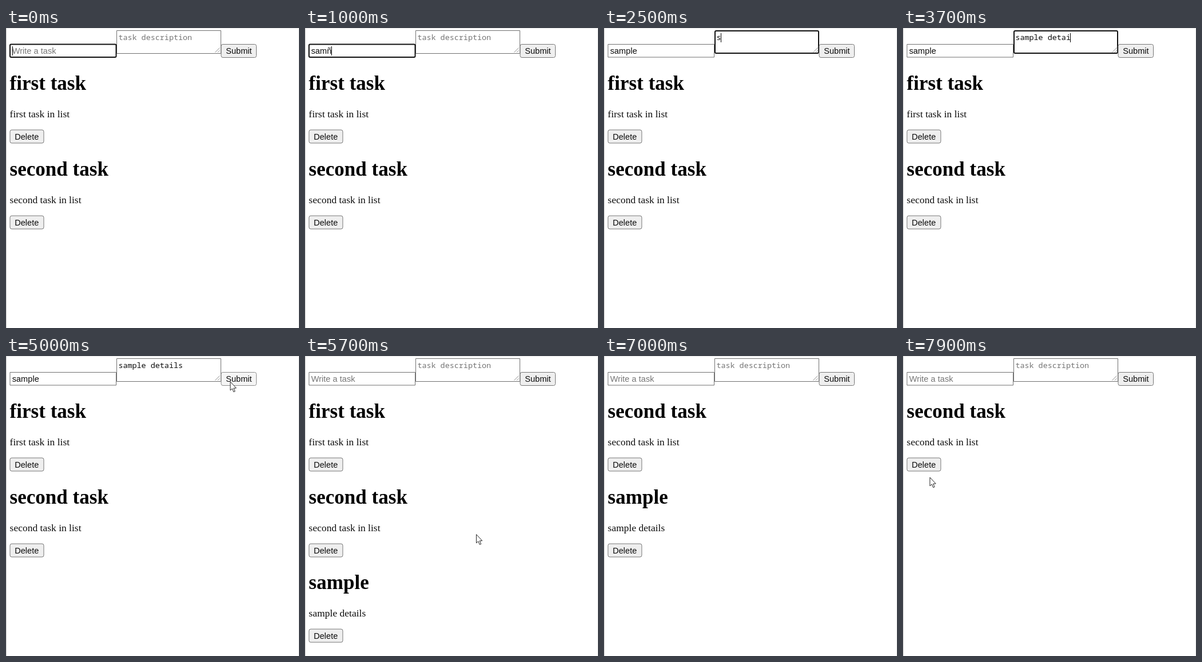
An HTML page with a canvas that plays this animation: 512 by 524 pixels, repeating every 8 s.

```html
<!DOCTYPE html>
<html lang="en">
<head>
<meta charset="utf-8">
<title>Task list</title>
<style>
html, body { margin: 0; width: 100%; height: 100%; overflow: hidden; background: #fff; }
canvas { display: block; }
</style>
</head>
<body>
<canvas id="stage" width="512" height="524"></canvas>
<script>
const ctx = document.getElementById('stage').getContext('2d');
const LOOP = 8000;
const TICK = 100;
const INK = '#0c0c0c';
const HINT = '#757575';
const SERIF = '"Liberation Serif", "Times New Roman", serif';
const UI = '14.6px "Liberation Sans", Arial, sans-serif';
const MONO = '13.42px "Noto Sans Mono", monospace';

// Moments of the user's actions, in ms.
const TAB = 2000, PRESS = 4900, SUBMIT = 5100, DELETE_FIRST = 6600, DELETE_LAST = 7600;

const TASKS = [
  { title: 'first task', detail: 'first task in list', from: 0, to: DELETE_FIRST },
  { title: 'second task', detail: 'second task in list', from: 0, to: LOOP },
  { title: 'sample', detail: 'sample details', from: SUBMIT, to: DELETE_LAST }
];

// The pointer glides to each stop between the times `leave` and `arrive`.
const START = { x: 386, y: 36 };
const STOPS = [
  { x: 392, y: 45, leave: 4800, arrive: PRESS },
  { x: 292, y: 333, leave: 5200, arrive: 5800 },
  { x: 51, y: 189, leave: 5900, arrive: 6500 },
  { x: 224, y: 230, leave: DELETE_FIRST, arrive: 6800 },
  { x: 143, y: 349, leave: 6800, arrive: 6900 },
  { x: 50, y: 333, leave: 7200, arrive: 7500 },
  { x: 47, y: 212, leave: DELETE_LAST, arrive: 7900 }
];

const clamp = v => Math.min(1, Math.max(0, v));
const smooth = v => v * v * (3 - 2 * v);
const between = (t, a, b) => t >= a && t < b;

function typed(str, t, start, step) {
  return str.slice(0, Math.max(0, Math.floor((t - start) / step) + 1));
}

function titleAt(t) {
  if (t >= SUBMIT) return '';
  if (t < 1200) return typed('samñ', t, 300, 500 / 3);
  return 'sam' + typed('ple', t, 1600, TICK);
}

function detailAt(t) {
  if (t >= SUBMIT) return '';
  return typed('sam', t, 2500, 200) + typed('ple details', t, 3000, 87);
}

function pointerAt(t) {
  if (t < 4800 || between(t, 7000, 7300)) return null;
  let { x, y } = START;
  for (const stop of STOPS) {
    const k = smooth(clamp((t - stop.leave) / (stop.arrive - stop.leave)));
    x += (stop.x - x) * k;
    y += (stop.y - y) * k;
  }
  return { x, y };
}

function text(str, x, y, font, color = INK) {
  ctx.font = font;
  ctx.fillStyle = color;
  ctx.fillText(str, x, y);
  return x + ctx.measureText(str).width;
}

function box(x, y, w, h, r, fill, stroke, line = 1) {
  ctx.beginPath();
  ctx.roundRect(x, y, w, h, r);
  ctx.fillStyle = fill;
  ctx.fill();
  ctx.lineWidth = line;
  ctx.strokeStyle = stroke;
  ctx.stroke();
}

function caret(x, y) {
  ctx.fillStyle = '#000';
  ctx.fillRect(Math.floor(x), y, 1, 16);
}

function button(label, x, y, w, pointer, pressed) {
  const hover = pointer && between(pointer.x, x, x + w) && between(pointer.y, y, y + 23);
  const fill = pressed ? '#f5f5f5' : hover ? '#e5e5e5' : '#efefef';
  const edge = pressed ? '#8d8d8d' : hover ? '#4f4f4f' : '#767676';
  box(x, y, w, 23, 3, fill, edge);
  text(label, x + 8.2, Math.round(y + 16.5), UI);
}

function resizeGrip() {
  ctx.beginPath();
  ctx.moveTo(365.5, 42.5);
  ctx.lineTo(373.5, 34.5);
  ctx.moveTo(370, 42.5);
  ctx.lineTo(373.5, 39);
  ctx.lineWidth = 0.9;
  ctx.strokeStyle = '#858585';
  ctx.stroke();
}

function drawForm(t, pointer) {
  const title = titleAt(t), detail = detailAt(t);
  const inTitle = t < TAB, inDetail = between(t, TAB, PRESS);

  if (inDetail) box(194, 5, 181, 39, 2, '#fff', '#101010', 2);
  else box(193.5, 4.5, 182, 40, 0, '#fff', '#707070');
  resizeGrip();
  const detailEnd = text(detail, 196.4, 21, MONO);
  if (!detail) text('task description', 196.4, 21, MONO, HINT);
  if (inDetail && t < 4500) caret(detailEnd - 0.3, 9);

  if (inTitle) box(7, 28.5, 185.5, 22.5, 2, '#fff', '#101010', 2);
  else box(7, 28.5, 185.5, 22.5, 0, '#fff', '#707070');
  const titleEnd = text(title, 10.7, 45, UI);
  if (!title) text('Write a task', 10.7, 45, UI, HINT);
  if (inTitle) caret(titleEnd + 0.4, 32);

  button('Submit', 376, 28.5, 61.5, pointer, between(t, PRESS, SUBMIT));
}

function drawTask(task, row, pointer) {
  const y = row * 149.7;
  text(task.title, 6.6, Math.round(y + 108), 'bold 35.05px ' + SERIF, '#000');
  text(task.detail, 6.6, Math.round(y + 156), '17.5px ' + SERIF);
  button('Delete', 7, Math.round(y + 178), 59, pointer, false);
}

function drawPointer({ x, y }) {
  ctx.beginPath();
  ctx.moveTo(x, y);
  for (const [dx, dy] of [[0, 15], [3.4, 12], [5.8, 17.7], [8.2, 16.7], [5.8, 11.2], [10.3, 11]]) {
    ctx.lineTo(x + dx, y + dy);
  }
  ctx.closePath();
  ctx.fillStyle = '#fff';
  ctx.fill();
  ctx.lineWidth = 1;
  ctx.strokeStyle = '#222';
  ctx.stroke();
}

function draw(t) {
  const pointer = pointerAt(t);
  ctx.fillStyle = '#fff';
  ctx.fillRect(0, 0, 512, 524);
  ctx.fillStyle = '#e8e8e8';
  ctx.fillRect(0, 0, 512, 1);
  ctx.fillRect(511, 0, 1, 524);
  ctx.fillStyle = '#c8c8c8';
  ctx.fillRect(0, 0, 1, 524);
  drawForm(t, pointer);
  TASKS.filter(task => between(t, task.from, task.to))
    .forEach((task, row) => drawTask(task, row, pointer));
  if (pointer) drawPointer(pointer);
}

// The picture advances in steps of one tick.
function frame() {
  const t = performance.now() % LOOP;
  draw(Math.floor(t / TICK) * TICK);
  requestAnimationFrame(frame);
}
frame();
</script>
</body>
</html>
```
